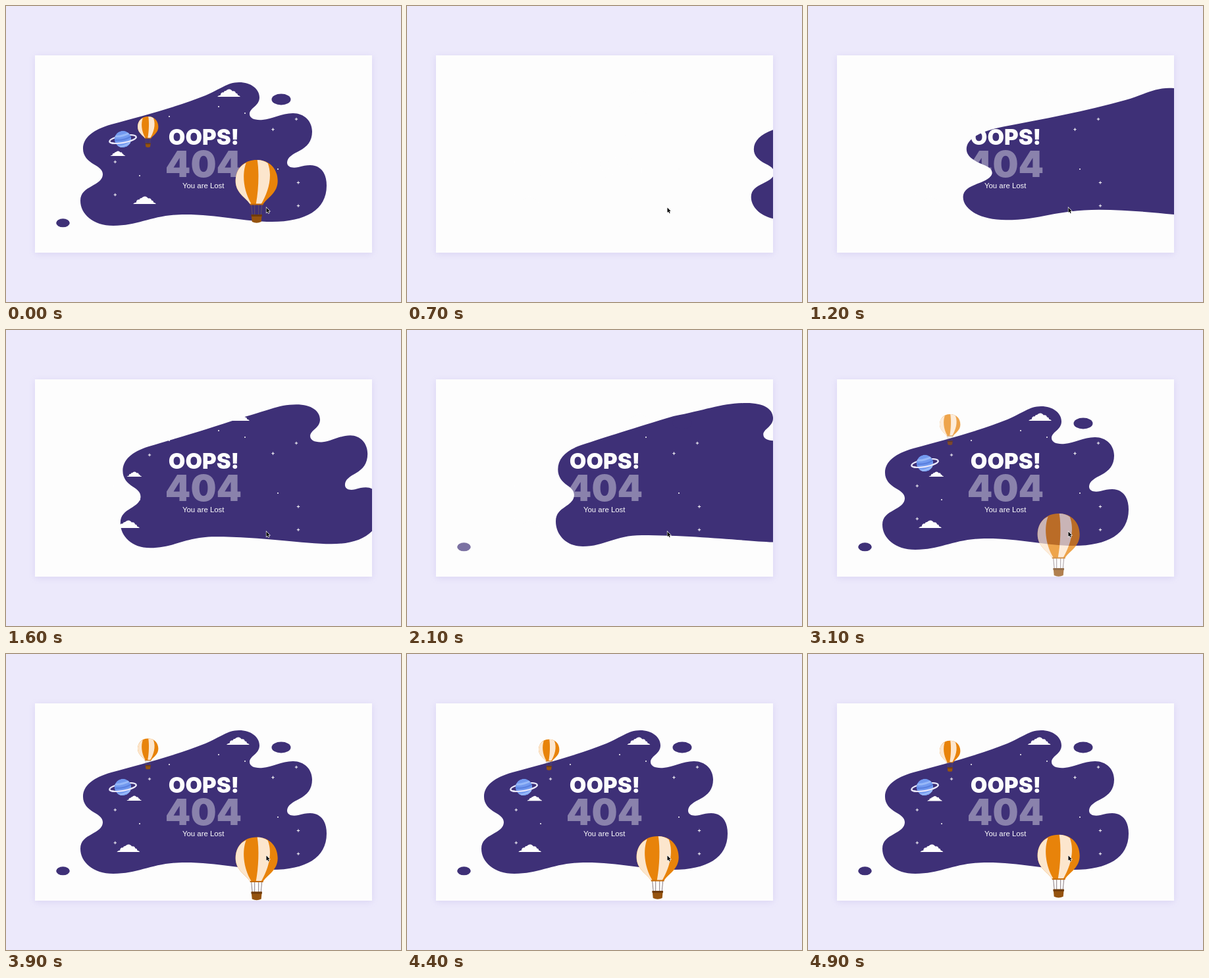
These frames come from a looping animation (600x450 px, 5000 ms). An HTML page:

```html
<!DOCTYPE html>
<html lang="en">
<head>
<meta charset="utf-8">
<title>Lost page</title>
<style>
  html, body { margin: 0; width: 100%; height: 100%; overflow: hidden; background: #ece9fb; }
  svg { display: block; width: 600px; height: 450px; }
  .card { fill: #fdfdfd; filter: drop-shadow(0 2px 5px rgba(110, 90, 200, .14)); }
  .night { fill: #3e3077; }
  .white { fill: #fdfdfd; }
  .ring { fill: none; stroke: #e9e8fb; stroke-width: 2.2; }
  .title { font: 900 33px "Arial Black", Inter, sans-serif; }
  .code { font: 900 55px "Arial Black", Inter, sans-serif; opacity: .4; }
  .note { font: 11.4px "Liberation Sans", Arial, sans-serif; }
</style>
</head>
<body>
<svg viewBox="0 0 600 450">
  <defs>
    <clipPath id="frame"><rect x="44" y="75" width="512" height="300"/></clipPath>
    <clipPath id="globe"><circle r="12.7"/></clipPath>
    <path id="cloud" class="white" d="M0 0Q2-2.500 5-2.500A3.500 3.500 0 0 1 9.500-6.500A3 3 0 0 1 13-9A6 6 0 0 1 23-8.500A3.500 3.500 0 0 1 28-5.500A3 3 0 0 1 31-2.500Q34-2 35 0Z"/>
    <g id="balloon">
      <path d="M-8 68L-6.500 84M8 68L6.500 84M-3 68V84M3 68V84" fill="none" stroke="#6d5b63" stroke-width=".8"/>
      <path d="M0 0C21 0 32 15 32 32C32 50 17 57 10 67H-10C-17 57-32 50-32 32C-32 15-21 0 0 0Z" fill="#e8830a"/>
      <g fill="#fce6cd">
        <path d="M-16 4.500C-22 20-21 45-8 67H-10C-17 57-32 50-32 32C-32 19-26 9-16 4.500Z"/>
        <path d="M1 0C4 18 3 46-1 67H7C17 50 25 26 17 5C12 1.500 7 0 1 0Z"/>
      </g>
      <path d="M-10 66.500H10V68.500H-10Z" fill="#c46a08"/>
      <path d="M-8 83H8L7 94Q0 97.500-7 94Z" fill="#95530f"/>
      <path d="M-8.200 83H8.200V86H-8.200Z" fill="#6f3b0c"/>
    </g>
  </defs>

  <rect class="card" x="44" y="75" width="512" height="300"/>
  <g clip-path="url(#frame)">
    <path id="blob" class="night" d="M117 217C117 200 132 188 160 180C205 168 258 154 303 136C325 127 336 116 354 116
      C372 116 385 126 385 139C385 152 370 155 370 164C370 171 378 174 390 173C404 172 418 163 436 163
      C453 163 465 175 465 191C465 206 457 214 446 220C436 225 427 230 427 238C427 245 435 247 444 245
      C451 243 456 242 462 242C478 242 487 254 487 273C487 310 455 328 404 328C362 328 322 317 272 317
      C222 317 204 334 163 334C132 334 113 316 113 296C113 284 121 279 130 274C139 269 147 264 147 256
      C147 249 141 245 134 241C124 235 117 228 117 217Z"/>
    <g id="drops" class="night">
      <ellipse cx="86.500" cy="329.800" rx="10.300" ry="6.500"/>
      <ellipse cx="418" cy="142" rx="14.500" ry="8.500"/>
    </g>
    <path fill="none" stroke="#fdfdfd" id="stars"/>
    <g id="planet" transform="translate(177.500 202.500) rotate(-10)">
      <ellipse class="ring" rx="20.500" ry="5.500"/>
      <g clip-path="url(#globe)" fill="none">
        <circle r="12.700" fill="#7299ef"/>
        <path d="M-13-7Q-3-3 13-8M-13 9Q2 13 13 5" stroke="#97b8f8" stroke-width="3"/>
        <path d="M-13-1Q0 3 13-2" stroke="#5a80df" stroke-width="2.500"/>
      </g>
      <path class="ring" d="M-20.500 0A20.500 5.500 0 0 0 20.500 0"/>
    </g>
    <use id="cloudTop" href="#cloud"/>
    <use id="cloudMid" href="#cloud"/>
    <use id="cloudLow" href="#cloud"/>
    <g class="white" text-anchor="middle">
      <text class="title" x="300.500" y="210.500">OOPS!</text>
      <text class="code" x="300" y="260">404</text>
      <text class="note" x="299.700" y="277">You are Lost</text>
    </g>
    <g id="balloons">
      <use id="small" href="#balloon"/>
      <use id="big" href="#balloon"/>
    </g>
  </g>
  <path transform="translate(395.500 306.500)" d="M0 0V7.500L1.700 5.900L3 8.800L4.200 8.300L2.900 5.500H5.200Z" stroke="#fff" stroke-width="1.200" paint-order="stroke"/>
</svg>
<script>
const LOOP = 5000, CLEAR = 300, SWAY = 7500, SWAY_START = 3400;
const $ = id => document.getElementById(id);

const ramp = (t, from, to) => Math.min(1, Math.max(0, (t - from) / (to - from)));
const smooth = u => u * u * (3 - 2 * u);
const rush = u => u ** 1.2;
const settle = u => 1 - (1 - u) ** 2;

// Poses of the blob, as distortions of its resting outline.
const rest = { shift: 0, stretch: 0, bulge: 0, lift: 0, squeeze: 1 };
const outside = { ...rest, shift: 448, squeeze: .92 };
const enter = { ...rest, shift: 123, stretch: .3, squeeze: .92 };
const squash = { ...rest, shift: 113, stretch: -.18, bulge: 107, lift: -5 };
const blend = (a, b, u) =>
  Object.fromEntries(Object.keys(a).map(k => [k, a[k] + (b[k] - a[k]) * u]));

const moves = [
  { from: 600, to: 1200, pose: enter, ease: rush },
  { from: 1200, to: 1500, pose: blend(squash, rest, .5), ease: settle },
  { from: 1500, to: 2100, pose: squash, ease: smooth },
  { from: 2300, to: 2500, pose: rest, ease: smooth },
];
const poseAt = t => moves.reduce(
  (pose, move) => blend(pose, move.pose, move.ease(ramp(t, move.from, move.to))), outside);

const outline = $("blob").getAttribute("d");
const warp = ({ shift, stretch, bulge, lift, squeeze }) =>
  outline.replace(/(\d+) (\d+)/g, (_, x, y) => {
    const dx = shift + stretch * (x - 113) + bulge * smooth(ramp(x, 270, 380));
    return `${+x + dx} ${225 + (y - 225) * squeeze + lift}`;
  });

const place = (id, x, y, scale = 1) =>
  $(id).setAttribute("transform", `translate(${x} ${y}) scale(${scale})`);

const sparkles = [[405.5, 187.7], [441, 172], [444, 268.5], [444, 303.7], [218, 190], [165.8, 237], [165.8, 287]];
const specks = [[323, 153], [363, 163], [248, 168], [203, 258], [413, 248]];
$("stars").setAttribute("d",
  sparkles.map(([x, y]) => `M${x - 2.2} ${y}h4.4M${x} ${y - 2.2}v4.4`).join("") +
  specks.map(([x, y]) => `M${x - .8} ${y - .4}h1.6m0 .8h-1.6`).join(""));

function draw(t) {
  const before = t < CLEAR;
  const fade = (id, from, to) => $(id).setAttribute("opacity", before ? 1 : ramp(t, from, to));
  const time = before ? SWAY + t : Math.max(0, t - SWAY_START);
  const sway = (1 - Math.cos(Math.PI * time / SWAY)) / 2;

  $("blob").setAttribute("d", warp(before ? rest : poseAt(t)));
  fade("drops", 1620, 2320);
  fade("planet", 2200, 2450);
  fade("balloons", 2550, 3300);

  place("cloudTop", 335 - 14 * sway, 138);
  place("cloudMid", 183.5 - 25 * sway, 223 + 5 * sway, .65);
  place("cloudLow", 168 + 25 * sway, 301);
  place("small", 215.7, 128 + 40 * sway, .49);
  place("big", 380.7, 279 - 45 * sway);
}

const start = performance.now();
function tick() {
  draw((performance.now() - start) % LOOP);
  requestAnimationFrame(tick);
}
tick();
</script>
</body>
</html>
```
